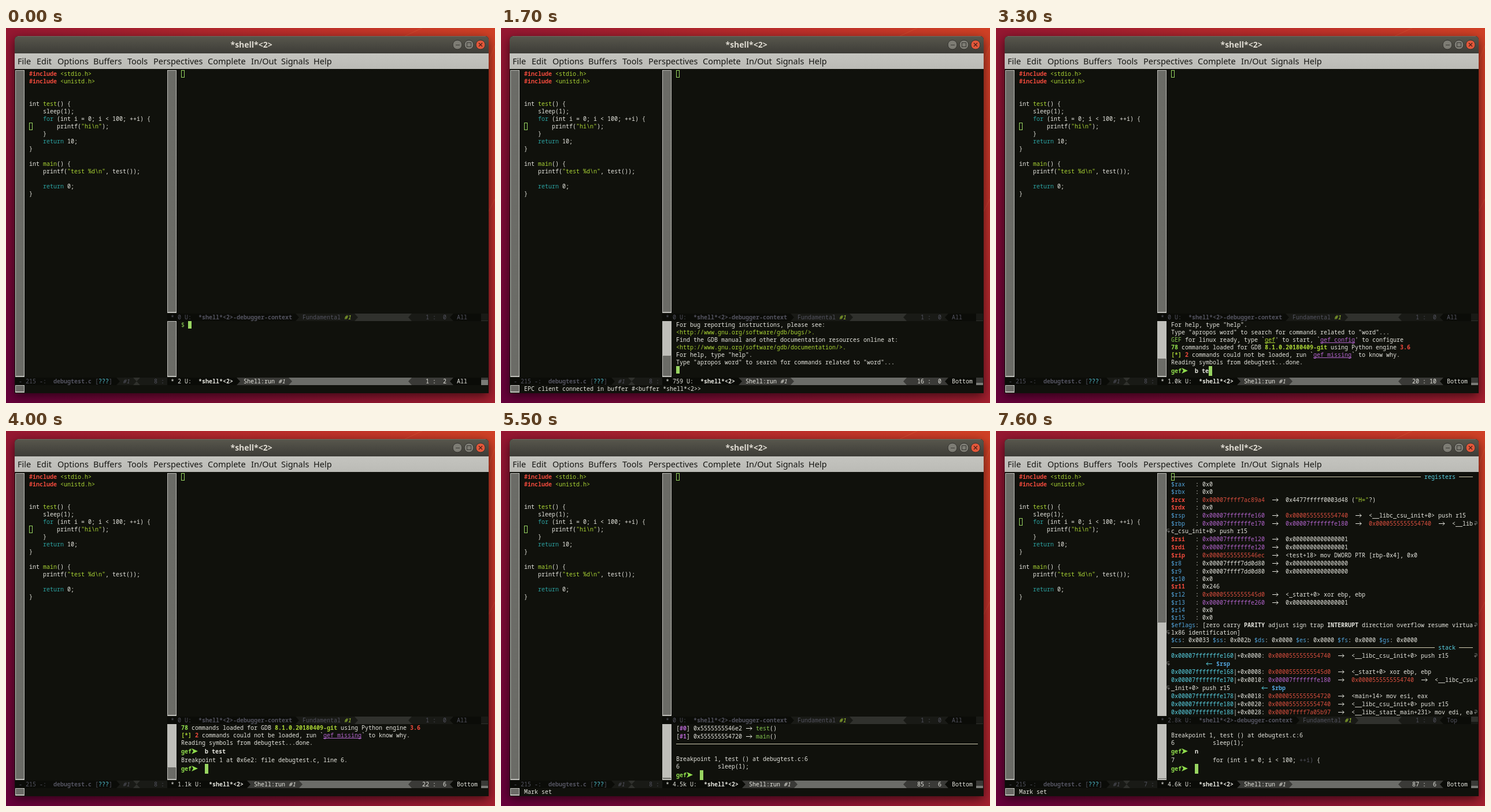
These frames come from a looping animation (846x650 px, 8000 ms). An HTML page with a canvas:

```html
<!DOCTYPE html>
<html lang="en">
<head>
<meta charset="utf-8">
<title>Debugger session</title>
<style>
html, body { margin: 0; width: 100%; height: 100%; overflow: hidden; background: #7c0c33; }
canvas { display: block; }
</style>
</head>
<body>
<canvas id="stage" width="846" height="650"></canvas>
<script>
const ctx = document.getElementById('stage').getContext('2d');
const LOOP = 8000, CELL = 6, ROW = 13;
const MONO = '10px "Noto Sans Mono", "DejaVu Sans Mono", monospace';
const SANS = '"Noto Sans", "Open Sans", sans-serif';
const BG = '#10110c', WHITE = '#e6e6df', LIME = '#a9d334', GREEN = '#98d561',
      RED = '#db4f3f', PURPLE = '#b264cc', BLUE = '#52a4dc', CYAN = '#58d0e2';

// Inline markup: "§" plus a letter switches the style. [colour, font prefix, underline]
const STYLES = {
  w: [WHITE], W: [WHITE, 'bold '], i: [WHITE, 'italic '],
  r: [RED], R: ['#f04a3c', 'bold '],
  l: [LIME], L: [LIME, 'bold '], I: [LIME, 'italic '], u: [LIME, '', true],
  g: ['#86c850'], G: ['#8fdc4c', 'bold '],
  p: [PURPLE], P: [PURPLE, 'bold '], U: [PURPLE, '', true],
  b: [BLUE], B: [BLUE, 'bold '], c: [CYAN], t: ['#2ba3a2'],
  d: ['#53535f'], D: ['#53535f', 'bold '], e: ['#53535f', 'italic '],
  h: ['#d2cdb2']
};

const rect = (x, y, w, h, color) => { ctx.fillStyle = color; ctx.fillRect(x, y, w, h); };

function poly(points, color) {
  ctx.fillStyle = color;
  ctx.beginPath();
  points.forEach(([x, y]) => ctx.lineTo(x, y));
  ctx.fill();
}

function stroke(points, color, width = 1) {
  ctx.strokeStyle = color;
  ctx.lineWidth = width;
  ctx.beginPath();
  points.forEach(([x, y], i) => i ? ctx.lineTo(x, y) : ctx.moveTo(x, y));
  ctx.stroke();
}

const glyphWidth = ch => ch === '➤' ? 11 : '→←'.includes(ch) ? 12 : CELL;

function drawGlyph(ch, x, y, [color, font = '', underline]) {
  if (ch === '─') rect(x, y, CELL, 1, color);
  else if (ch === '➤') poly([[x, y - 5], [x + 11, y], [x, y + 5], [x + 3, y]], color);
  else if ('→←'.includes(ch)) {
    const dir = ch === '→' ? 1 : -1, mid = x + 6, cy = y + .5;
    stroke([[mid - 5 * dir, cy], [mid + 5 * dir, cy]], color);
    stroke([[mid + 2 * dir, cy - 3], [mid + 5 * dir, cy], [mid + 2 * dir, cy + 3]], color);
  } else if (ch !== ' ') {
    ctx.font = font + MONO;
    ctx.fillStyle = color;
    ctx.fillText(ch, x, y + 4);
  }
  if (underline) rect(x, y + 5, CELL, 1, color);
}

// Splits marked-up text into rows of [glyph, style, x] no wider than the limit.
function layout(text, limit = Infinity) {
  const rows = [[]];
  let style = STYLES.w, x = 0;
  const chars = [...text];
  for (let i = 0; i < chars.length; i++) {
    if (chars[i] === '§') { style = STYLES[chars[++i]]; continue; }
    const w = glyphWidth(chars[i]);
    if (x + w > limit) { rows.push([]); x = 0; }
    rows[rows.length - 1].push([chars[i], style, x]);
    x += w;
  }
  return { rows, end: x };
}

function drawText(text, x, y) {
  const { rows, end } = layout(text);
  rows[0].forEach(([ch, style, dx]) => drawGlyph(ch, x + dx, y, style));
  return x + end;
}

// Small hook in the margin of a wrapped line.
function wrapMark(x, y, dir) {
  stroke([[x - 2 * dir, y - 3], [x + 2 * dir, y - 3], [x + 2 * dir, y + 1], [x - 2 * dir, y + 1]], '#6a6a68');
  poly([[x - 3 * dir, y + 1], [x, y - 1], [x, y + 4]], '#6a6a68');
}

// Draws buffer lines from the given top row; returns where the last one ended.
function drawBuffer(lines, x, firstY) {
  let y = firstY - ROW, extra = 0, end = x, tall = false;
  for (const line of lines) {
    const { rows, end: lineEnd } = layout(line, 522);
    rows.forEach((row, i) => {
      const has = set => row.some(([ch]) => set.includes(ch));
      tall = has('➤');
      y += ROW + extra + (tall ? 2 : has('→←') ? 1 : 0);
      extra = tall ? 2 : 0;
      row.forEach(([ch, style, dx]) => drawGlyph(ch, x + dx, y, style));
      if (i) wrapMark(298, y, -1);
      if (i < rows.length - 1) wrapMark(830, y, 1);
    });
    end = x + lineEnd;
  }
  return { x: end, y, tall };
}

const hollowCursor = (x, y) => {
  ctx.strokeStyle = GREEN;
  ctx.lineWidth = 1;
  ctx.strokeRect(x + .5, y - 5.5, 5, 12);
};

const code = [
  '§R#include§l <stdio.h>', '§R#include§l <unistd.h>', '', '',
  '§wint §ltest§w() {', '    sleep(1);',
  '    §tfor§w (int i = 0; i < 100; ++i) {',
  '        printf(§l"hi\\n"§w);', '    }', '    §treturn§w 10;', '}', '',
  'int §lmain§w() {', '    printf(§l"test %d\\n"§w, test());', '',
  '    §treturn§w 0;', '}'
];

const PROMPT = '§Ggef➤  §W';
const rule = n => '§h' + '─'.repeat(n);
const log = [
  '§g$ §wgdb debugtest',
  'For bug reporting instructions, please see:',
  '§l<http://www.gnu.org/software/gdb/bugs/>.',
  'Find the GDB manual and other documentation resources online at:',
  '§l<http://www.gnu.org/software/gdb/documentation/>.',
  'For help, type "help".',
  'Type "apropos word" to search for commands related to "word"...',
  '§gGEF§w for linux ready, type `§ugef§w\' to start, `§Ugef config§w\' to configure',
  '§G78§w commands loaded for GDB §L8.1.0.20180409-git§w using Python engine §R3.6',
  '§L[*] §R2§w commands could not be loaded, run `§Ugef missing§w` to know why.',
  'Reading symbols from debugtest...done.',
  PROMPT + 'b test',
  'Breakpoint 1 at 0x6e2: file debugtest.c, line 6.',
  PROMPT + 'r',
  'Starting program: /tmp/debugtest/debugtest',
  '[§P#0§w] 0x5555555546e2 → §gtest§w()',
  '[§P#1§w] 0x555555554720 → §gmain§w()',
  rule(87), '',
  'Breakpoint 1, test () at debugtest.c:6',
  '6           sleep(1);',
  PROMPT + 'n',
  '7           for (int i = 0; i < 100; §d++i)§w {'
];

// Stack addresses are purple, code addresses red.
const tint = text => text
  .replace(/0x00007fffffff\w+/g, '§p$&§w')
  .replace(/0x0000(5555|7ffff7a)\w+/g, '§r$&§w')
  .replace(/"[^"]*"/g, '§l$&§w');

const INIT = '0x0000555555554740  →  <__libc_csu_init+0> push r15';
const HEAP = '0x00007ffff7dd0d80  →  0x0000000000000000';
const common = {
  rax: '0x0', rbx: '0x0', rcx: INIT, rdx: '0x0',
  rsp: '0x00007fffffffe160  →  ' + INIT,
  rbp: '0x00007fffffffe170  →  0x00007fffffffe180  →  ' + INIT,
  rsi: '', rdi: '0x1', rip: '', r8: HEAP, r9: HEAP, r10: '0x0', r11: '0x0',
  r12: '0x00005555555545d0  →  <_start+0> xor ebp, ebp',
  r13: '0x00007fffffffe260  →  0x0000000000000001', r14: '0x0', r15: '0x0'
};
const ONE = '0x00007fffffffe120  →  0x0000000000000001';

function context(values, changed) {
  const label = name => (changed.includes(name) ? '§R' : '§b') + ('$' + name).padEnd(7) + '§w: ';
  const segments = [['cs', '0033'], ['ss', '002b'], ['ds', '0000'], ['es', '0000'], ['fs', '0000'], ['gs', '0000']];
  const stack = [
    INIT + ' '.repeat(17) + '§c← §B$rsp',
    '0x00005555555545d0  →  <_start+0> xor ebp, ebp',
    '0x00007fffffffe180  →  ' + INIT + ' '.repeat(9) + '§c← §B$rbp',
    '0x0000555555554720  →  <main+14> mov esi, eax',
    INIT,
    '0x00007ffff7a05b97  →  <__libc_start_main+231> mov edi, eax'
  ];
  return [
    rule(72) + ' §cregisters ' + rule(4),
    ...Object.entries({ ...common, ...values }).map(([name, value]) => label(name) + tint(value)),
    label('eflags') +
      '[zero carry §WPARITY§w adjust sign trap §WINTERRUPT§w direction overflow resume virtualx86 identification]',
    segments.map(([name, value]) => `§b$${name}§w: 0x${value}`).join(' '),
    rule(76) + ' §cstack ' + rule(4),
    ...stack.map((value, i) => {
      const offset = (i * 8).toString(16);
      return `§c0x00007fffffffe1${(0x60 + i * 8).toString(16)}§w|+0x${offset.padStart(4, '0')}: ${tint(value)}`;
    })
  ];
}

const contexts = {
  first: context({
    rdx: '0x00007fffffffe278  →  0x00007fffffffe638  →  "CLUTTER_IM_MODULE=xim"',
    rsi: '0x00007fffffffe268  →  0x00007fffffffe61f  →  "/tmp/debugtest/debugtest"',
    rip: '0x00005555555546e2  →  <test+8> mov edi, 0x1'
  }, ['rcx', 'rdx', 'rsp', 'rbp', 'rsi', 'rip', 'r8', 'r9', 'r12', 'r13', 'eflags']),
  second: context({
    rcx: '0x00007ffff7ac89a4  →  0x4477fffff0003d48 ("H="?)',
    rsi: ONE, rdi: ONE, r11: '0x246',
    rip: '0x00005555555546ec  →  <test+18> mov DWORD PTR [rbp-0x4], 0x0'
  }, ['rcx', 'rdx', 'rsi', 'rdi', 'rip', 'r11'])
};

// Each step overrides parts of the state from its time on.
const steps = [
  [0, { done: 0, rows: 7, current: '§g$ ', size: '2', line: 1, col: 2, where: 'All', thumb: 508,
        message: '', codeLine: 8, context: null, contextThumb: 73 }],
  [400, { current: log[0], size: '15', col: 15 }],
  [500, { done: 1, current: '', size: '16', line: 2, col: 0 }],
  [900, { message: 'Mark set' }],
  [1500, { done: 7, size: '759', line: 16, where: 'Bottom', thumb: 568, message: '' }],
  [1600, { message: 'EPC client connected in buffer #<buffer *shell*<2>>' }],
  [2100, { done: 10, size: '1.0k', line: 19, thumb: 573 }],
  [2500, { done: 11, current: PROMPT, line: 20, col: 6 }],
  [2900, { current: PROMPT + 'b', col: 7, message: '' }],
  [3000, { current: PROMPT + 'b ', col: 8 }],
  [3200, { current: PROMPT + 'b t', col: 9 }],
  [3300, { current: PROMPT + 'b te', col: 10 }],
  [3600, { current: PROMPT + 'b test', col: 12, thumb: 574 }],
  [3800, { thumb: 575 }],
  [4000, { done: 13, rows: 6, current: PROMPT, size: '1.1k', line: 22, col: 6, thumb: 583 }],
  [5100, { current: PROMPT + 'r', col: 7 }],
  [5400, { done: 15, current: '', line: 24, col: 0, thumb: 592, message: 'Mark set' }],
  [5500, { done: 21, rows: 7, current: PROMPT, size: '4.5k', line: 85, col: 6, thumb: 601 }],
  [5600, { context: 'first', contextThumb: 337, codeLine: 6 }],
  [6200, { current: PROMPT + 'n', col: 7 }],
  [6300, { done: 22, current: '', line: 86, col: 0, message: '' }],
  [7400, { done: 23, rows: 6, current: PROMPT, size: '4.6k', line: 87, col: 6, thumb: 602 }],
  [7600, { context: 'second', contextThumb: 332, codeLine: 7, message: 'Mark set' }]
];

const checker = (() => {
  const tile = document.createElement('canvas');
  tile.width = tile.height = 2;
  const c = tile.getContext('2d');
  c.fillStyle = BG;
  c.fillRect(0, 0, 2, 2);
  c.fillStyle = '#c6c6c1';
  c.fillRect(0, 0, 1, 1);
  c.fillRect(1, 1, 1, 1);
  return ctx.createPattern(tile, 'repeat');
})();

// The trough is checkered between "from" and "to"; the rest is the solid thumb and frame.
function scrollbar(x, top, bottom, from = top + 1, to = bottom - 2) {
  rect(x, top, 16, bottom - top, '#bfbfba');
  rect(x + 1, from, 14, to - from, checker);
}

function linear(x0, y0, x1, y1, ...colors) {
  const g = ctx.createLinearGradient(x0, y0, x1, y1);
  colors.forEach((color, i) => g.addColorStop(i / (colors.length - 1), color));
  return g;
}

function drawDesktop() {
  rect(0, 0, 846, 650, linear(60, 700, 780, -40, '#66003a', '#7e0c34', '#9b1a30', '#b92c2b', '#d04025'));
  ctx.globalAlpha = .15;
  stroke([[690, 14], [720, 0]], '#ffb060');
  stroke([[835, 60], [846, 30]], '#ffb060');
  stroke([[835, 318], [846, 296]], '#ffb060');
  ctx.globalAlpha = 1;
}

function drawFrame() {
  ctx.save();
  ctx.shadowColor = 'rgba(0,0,0,.6)';
  ctx.shadowBlur = 18;
  ctx.shadowOffsetY = 5;
  ctx.fillStyle = BG;
  ctx.beginPath();
  ctx.roundRect(15, 14, 820, 619, [6, 6, 0, 0]);
  ctx.fill();
  ctx.restore();
  ctx.fillStyle = linear(0, 14, 0, 44, '#58574d', '#3d3c37');
  ctx.beginPath();
  ctx.roundRect(15, 14, 820, 30, [6, 6, 0, 0]);
  ctx.fill();
  rect(20, 14, 810, 1, '#6b6a60');
  rect(15, 44, 820, 27, linear(0, 44, 0, 71, '#c4c4bf', '#bbbbb6'));

  ctx.font = 'bold 14px ' + SANS;
  ctx.fillStyle = '#dfdbd2';
  ctx.fillText('*shell*<2>', 388.5, 34);
  ctx.font = '14.5px ' + SANS;
  ctx.fillStyle = '#161613';
  const menu = { File: 20, Edit: 53, Options: 89, Buffers: 151, Tools: 210, Perspectives: 255,
                 Complete: 349, 'In/Out': 424, Signals: 476, Help: 532 };
  for (const name in menu) ctx.fillText(name, menu[name], 63);

  [781, 801, 821].forEach((x, i) => {
    ctx.fillStyle = i === 2 ? '#e2573a' : '#7d7c74';
    ctx.strokeStyle = '#34332f';
    ctx.lineWidth = 1;
    ctx.beginPath();
    ctx.arc(x, 29, 8, 0, 7);
    ctx.fill();
    ctx.stroke();
  });
  stroke([[778, 29.5], [785, 29.5]], '#3a3935');
  ctx.strokeRect(797.5, 25.5, 7, 7);
  stroke([[818, 26], [824, 32]], '#4a2018', 1.3);
  stroke([[824, 26], [818, 32]], '#4a2018', 1.3);
}

// Powerline segment whose tip points right or left.
function segment(from, tip, y, color) {
  const dir = Math.sign(tip - from), edge = tip - 6 * dir;
  poly([[from, y - 6], [edge, y - 6], [tip, y + .5], [edge, y + 7], [from, y + 7]], color);
}

const shades = active => active
  ? { dark: '#0a0b07', mid: '#3a3a37', fill: '#6b6c68' }
  : { dark: '#0b0c08', mid: '#191a16', fill: '#30312d' };

function modeline(y, active, size, name, mode, line, col, where, hudTop, hudHeight) {
  const { dark, mid, fill } = shades(active);
  const [plain, bold] = active ? ['§w', '§W'] : ['§d', '§D'];
  const parts = [`${plain}* ${size} U:  ${bold}${name}`, `${plain}${mode} ${active ? '§i' : '§I'}#1`];
  const nameEnd = 285 + layout(parts[0]).end;
  const modeEnd = nameEnd + 18 + layout(parts[1]).end;
  rect(279, y - 6, 556, ROW, fill);
  segment(279, modeEnd + 12, y, mid);
  segment(279, nameEnd + 12, y, dark);
  segment(822, 696, y, mid);
  segment(822, 768, y, dark);
  rect(822, y - 6, 12, ROW, mid);
  rect(822, y - 6 + hudTop, 12, hudHeight, active ? '#7a7b77' : fill);
  rect(834, y - 6, 1, ROW, BG);
  drawText(parts[0], 285, y);
  drawText(parts[1], nameEnd + 18, y);
  drawText(plain + `${line} : ${String(col).padStart(2)}`.padStart(8), 714, y);
  drawText(plain + where, 780, y);
}

function codeModeline(line) {
  const { dark, mid, fill } = shades(false);
  rect(16, 606, 263, ROW, fill);
  segment(16, 226, 612, mid);
  segment(279, 226, 612, mid);
  segment(16, 197, 612, dark);
  drawText('§d- 215 -:  §Ddebugtest.c §d[§c???§d]', 22, 612);
  drawText('§e#1', 202, 612);
  drawText(`§d${line} :`, 256, 612);
}

function draw(s) {
  drawDesktop();
  drawFrame();
  scrollbar(16, 73, 605);
  scrollbar(279, 73, 494, ...(s.context ? [74, s.contextThumb] : []));
  scrollbar(279, 508, 605, Math.max(s.thumb, 509));
  scrollbar(16, 619, 632);

  code.forEach((line, i) => drawText(line, 40, 79 + i * ROW));
  hollowCursor(40, 79 + (s.codeLine - 1) * ROW);

  if (s.context) {
    ctx.save();
    ctx.beginPath();
    ctx.rect(295, 72, 540, 422);
    ctx.clip();
    drawBuffer(contexts[s.context], 303, 79);
    ctx.restore();
  }
  hollowCursor(303, 79);

  const lines = [...log.slice(0, s.done), s.current].slice(-s.rows);
  const cursor = drawBuffer(lines, 303, 514);
  rect(cursor.x, cursor.y - (cursor.tall ? 8 : 6), CELL, cursor.tall ? 17 : ROW, GREEN);

  codeModeline(s.codeLine);
  const contextHud = s.context ? [0, 9] : [12, 1];
  modeline(501, false, s.context ? '2.8k' : '0', '*shell*<2>-debugger-context', 'Fundamental',
    1, 0, s.context ? 'Top' : 'All', ...contextHud);
  const shellHud = s.where === 'Bottom' ? [9, 4] : [4, 9];
  modeline(612, true, s.size, '*shell*<2>', 'Shell:run', s.line, s.col, s.where, ...shellHud);
  drawText(s.message, 40, 625);
}

let shown = -1;
function tick(now) {
  const time = now % LOOP;
  const count = steps.filter(([start]) => start <= time).length;
  if (count !== shown) {
    shown = count;
    draw(Object.assign({}, ...steps.slice(0, count).map(([, change]) => change)));
  }
  requestAnimationFrame(tick);
}
requestAnimationFrame(tick);
</script>
</body>
</html>
```
